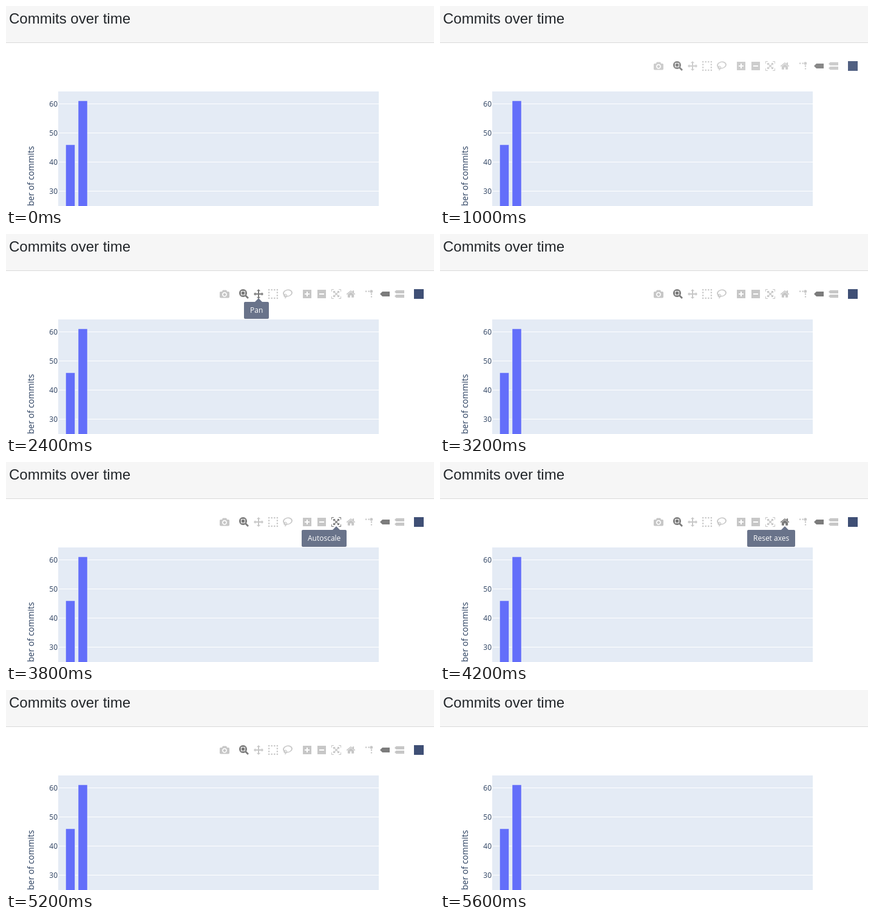
Animation, 705 px wide and 330 px high, one loop 7.8 s. Source, as an HTML page:

```html
<!DOCTYPE html>
<html lang="en">
<head>
<meta charset="utf-8">
<title>Commits over time</title>
<style>
html, body { margin: 0; width: 100%; height: 100%; overflow: hidden; background: #fff; }
svg { display: block; }
#stage { position: absolute; left: 0; top: 0; }
.chart { font-family: "Open Sans", sans-serif; fill: #2a3f5f; }
.btn { fill: #444; fill-opacity: .3; }
.btn.on { fill-opacity: .7; }
#tip {
  position: absolute; top: 112px; padding: 8px 10px; border-radius: 2px;
  background: #69738a; color: #fff; white-space: nowrap;
  font: 12px/12px "Open Sans", sans-serif;
}
#arrow {
  position: absolute; top: 100px; border: 6px solid transparent;
  border-bottom-color: #69738a;
}
</style>
</head>
<body>
<svg id="stage" width="705" height="330">
  <rect width="705" height="60" fill="#f6f6f6"/>
  <rect y="60" width="705" height="1" fill="#dadada"/>
  <text x="5" y="29" font-size="24" fill="#212529" font-family="Liberation Sans, Arial, sans-serif">Commits over time</text>
  <g class="chart">
    <rect x="86" y="141" width="528" height="189" fill="#e4ebf5"/>
    <g id="grid" font-size="12" text-anchor="end"></g>
    <g fill="#636efa" stroke="#e4ebf5" stroke-width=".5">
      <rect x="98.5" y="229" width="15" height="110"/>
      <rect x="119" y="156.5" width="15" height="180"/>
    </g>
    <text transform="translate(45.5 231) rotate(-90)" font-size="14" text-anchor="end">Number of commits</text>
  </g>
  <g id="bar"></g>
</svg>
<div id="arrow"></div>
<div id="tip"></div>
<script>
const $ = id => document.getElementById(id);
const LOOP = 7800;

$("grid").innerHTML = [60, 50, 40, 30].map((n, i) => {
  const y = 161 + 48 * i;
  return `<rect x="86" y="${y}" width="528" height="1" fill="#fff"/><text x="85" y="${y + 5}">${n}</text>`;
}).join("");

// Dotted square outline: the rim of a 4 x 4 grid
function dots() {
  let d = "";
  for (let i = 0; i < 4; i++)
    for (let j = 0; j < 4; j++)
      if (i % 3 == 0 || j % 3 == 0)
        d += `M${i * 286} ${850 - j * 286}v-143h143v143z`;
  return d;
}

// Toolbar buttons: centre x, tip left edge, tip text, icon width, icon path (y up)
const buttons = [
  [360, 226, "Download plot as a png", 1000, "m500 450c-83 0-150-67-150-150 0-83 67-150 150-150 83 0 150 67 150 150 0 83-67 150-150 150z m400 150h-120c-16 0-34 13-39 29l-31 93c-6 15-23 28-40 28h-340c-16 0-34-13-39-28l-31-94c-6-15-23-28-40-28h-120c-55 0-100-45-100-100v-450c0-55 45-100 100-100h800c55 0 100 45 100 100v450c0 55-45 100-100 100z m-400-550c-138 0-250 112-250 250 0 138 112 250 250 250 138 0 250-112 250-250 0-138-112-250-250-250z"],
  [392, 357, "Zoom", 1000, "m1000-25l-250 251c40 63 63 138 63 218 0 224-182 406-407 406-224 0-406-182-406-406s183-406 407-406c80 0 155 22 218 62l250-250 125 125z m-812 250l0 438 437 0 0-438-437 0z m62 375l313 0 0-312-313 0 0 312z"],
  [416, 392, "Pan", 1000, "m1000 350l-187 188 0-125-250 0 0 250 125 0-188 187-187-187 125 0 0-250-250 0 0 125-188-188 186-187 0 125 252 0 0-250-125 0 187-188 188 188-125 0 0 250 250 0 0-126 187 188z"],
  [440, 380, "Box Select", 1000, dots()],
  [464, 394, "Lasso Select", 1031, "m1018 538c-36 207-290 336-568 286-277-48-473-256-436-463 10-57 36-108 76-151-13-66 11-137 68-183 34-28 75-41 114-42l-55-70c-14-15-12-37 1-48 14-11 34-8 45 4l115 145c16 11 31 24 45 40 4 3 6 7 8 11 48-3 100 0 151 9 278 48 473 255 436 462z m-624-379c-80 14-149 48-197 96 42 42 109 47 156 9 33-26 47-66 41-105z m-187-74c-19 16-33 37-39 60 50-32 109-55 174-68-42-25-95-24-135 8z m360 75c-34-7-69-9-102-8 8 62-16 128-68 170-73 59-175 54-244-5-9 20-16 40-20 61-28 159 121 317 333 354s407-60 434-217c28-159-121-318-333-355z"],
  [496, 447, "Zoom in", 875, "m1 787l0-875 875 0 0 875-875 0z m687-500l-187 0 0-187-125 0 0 187-188 0 0 125 188 0 0 187 125 0 0-187 187 0 0-125z"],
  [520, 463, "Zoom out", 875, "m0 788l0-876 876 0 0 876-876 0z m688-500l-500 0 0 125 500 0 0-125z"],
  [544, 487, "Autoscale", 1000, "m250 850h-250v-250h63v188h187z m688 0h-188v-62h188v-188h62v250z m-875-938v188h-63v-250h250v62z m875 188v-188h-188v-62h250v250z m-125 188l-1 0-93-94-156 156 156 156 92-93 2 0 0 250-250 0 0-2 93-92-156-156-156 156 94 92 0 2-250 0 0-250 93 93 157-156-157-156-93 94 0-250 250 0-94 93 156 157 156-157-93-93 250 0 0 250z"],
  [568, 506, "Reset axes", 928.6, "m786 296v-267q0-15-11-26t-25-10h-214v214h-143v-214h-214q-15 0-25 10t-11 26v267q0 1 0 2t0 2l321 264 321-264q1-1 1-4z m124 39l-34-41q-5-5-12-6h-2q-7 0-12 3l-386 322-386-322q-7-4-13-4-7 2-12 7l-35 41q-4 5-3 13t6 12l401 334q18 15 42 15t43-15l136-114v109q0 8 5 13t13 5h107q8 0 13-5t5-13v-227l122-102q5-5 6-12t-4-13z"],
  [600, 495, "Toggle Spike Lines", 1000, "M768 613a155 155 0 1 0-310 0a155 155 0 1 0 310 0zM277 555h138v138h-138zM0 555h138v138h-138zM555 276h138v139h-138zM555 0h138v138h-138z"],
  [624, 0, "", 1500, "m375 725l-375-375 375-375 1125 0 0 750z"],
  [648, 513, "Compare data on hover", 1125, "m187 786l0 2-187-188 188-187 937 0 0 373-938 0z m0-499l0 1-187-188 188-188 937 0 0 376-938-1z"]
];

$("bar").innerHTML = buttons.map(([x, , , w, d]) =>
  `<svg class="btn" x="${x - 8}" y="91" width="16" height="16" viewBox="0 0 ${w} 1000" overflow="visible">
    <path fill-rule="evenodd" transform="matrix(1 0 0 -1 0 850)" d="${d}"/></svg>`
).join("") + '<rect x="672" y="91" width="16" height="16" fill="#3f4f75"/>';
const icons = document.querySelectorAll(".btn");

// [start time, hovered button]; -1 is none
const hovers = [[0, -1], [1800, 0], [2000, -1], [2200, 1], [2400, 2], [2800, 3], [3000, 4],
  [3200, -1], [3400, 5], [3600, 6], [3800, 7], [4200, 8], [4400, 9], [4600, 11], [5200, -1]];
// [start time, toolbar opacity]
const fades = [[0, 0], [1000, .9], [1200, 1], [5400, .4], [5600, 0]];
const active = [1, 10];

const at = (steps, t) => steps.filter(s => s[0] <= t).pop()[1];

function draw(t) {
  const hover = at(hovers, t), shown = hover >= 0;
  $("bar").setAttribute("opacity", at(fades, t));
  icons.forEach((icon, i) => icon.classList.toggle("on", i == hover || active.includes(i)));
  $("tip").hidden = $("arrow").hidden = !shown;
  if (!shown) return;
  const [x, left, label] = buttons[hover];
  $("tip").textContent = label;
  $("tip").style.left = left + "px";
  $("arrow").style.left = x - 6 + "px";
}

const start = performance.now();
function frame() {
  draw((performance.now() - start) % LOOP);
  requestAnimationFrame(frame);
}
frame();
</script>
</body>
</html>
```
